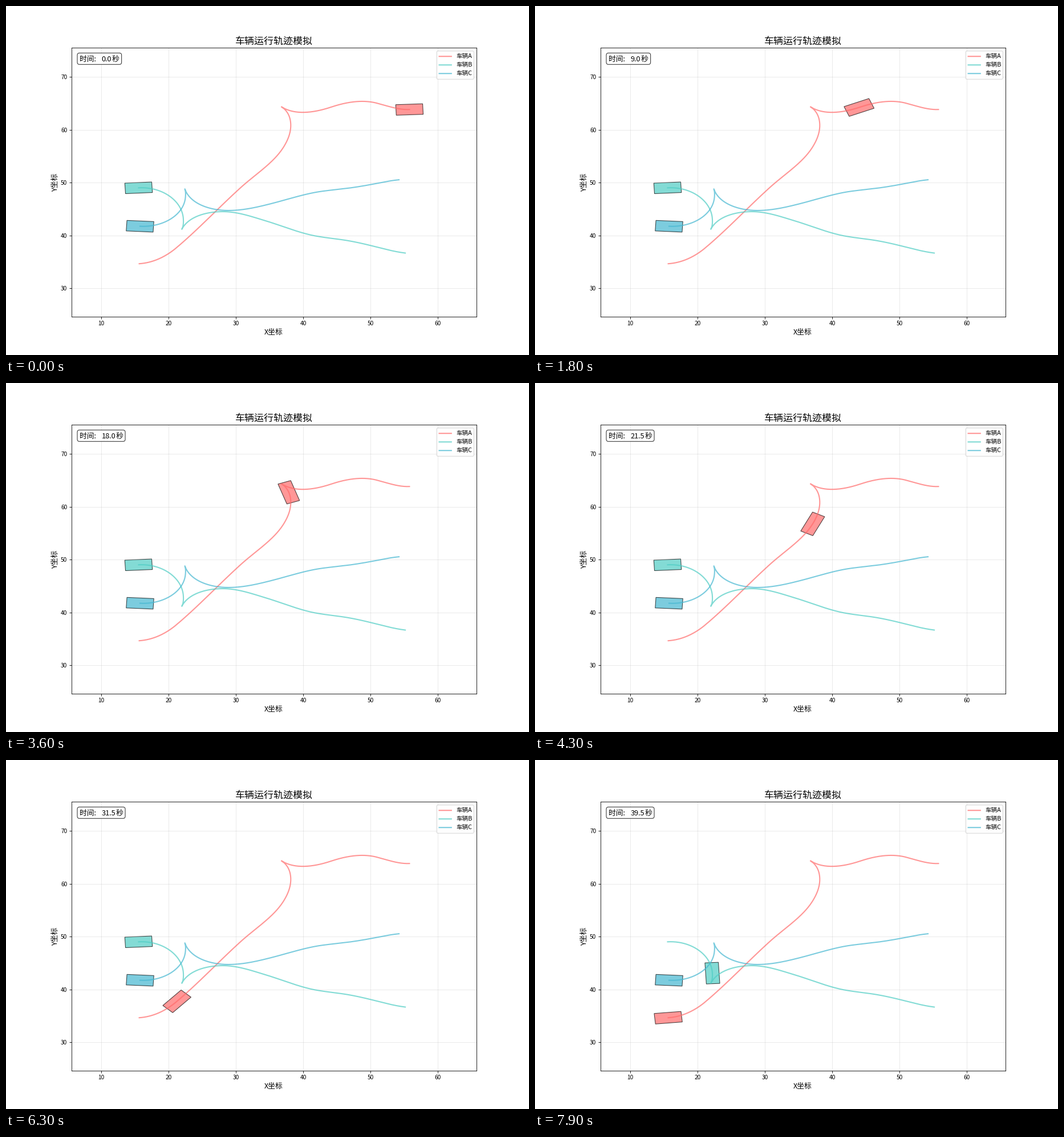
These frames come from a looping animation (917 px wide and 611 px high, 8 s). A matplotlib script:

```python
import numpy as np
import matplotlib.pyplot as plt
from matplotlib.animation import FuncAnimation
from matplotlib.patches import FancyBboxPatch, Polygon

W, H, DPI = 917, 611, 76.4
FRAMES, INTERVAL = 80, 100
EM = 12 * DPI / 72
plt.rcParams["font.family"] = "Noto Sans CJK JP"

# the tiny surplus keeps the pixel size from rounding down
fig = plt.figure(figsize=((W + 1e-6) / DPI, (H + 1e-6) / DPI), dpi=DPI, facecolor="white")
ax = fig.add_subplot()
ax.set(xlim=(5.6, 65.75), ylim=(24.65, 75.5),
       xticks=range(10, 61, 10), yticks=range(30, 71, 10))
ax.tick_params(labelsize=9.5)
ax.grid(alpha=0.3)

# overlay in stage pixels, y pointing down
hud = fig.add_axes([0, 0, 1, 1])
hud.set(xlim=(0, W), ylim=(H, 0))
hud.axis("off")


def smooth(u):
    return u * u * (3 - 2 * u)


def cruise(u, ramp=0.174):
    """Constant speed with short linear ramps at both ends."""
    edge = min(u, 1 - u)
    if edge >= ramp:
        return (u - ramp / 2) / (1 - ramp)
    s = edge**2 / (2 * ramp * (1 - ramp))
    return s if u < 0.5 else 1 - s


def drive(poses):
    """Join poses (stage x, y, heading in degrees) with near-circular arcs."""
    x, y, deg = np.array(poses, float).T
    p = ax.transData.inverted().transform(np.c_[x, H - y])
    a = np.radians(deg)
    d = np.c_[np.cos(a), np.sin(a)]
    t = np.linspace(0, 1, 50, endpoint=False)[:, None]
    arcs = []
    for i in range(len(p) - 1):
        k = np.hypot(*(p[i + 1] - p[i])) / (3 * np.cos((a[i + 1] - a[i]) / 4)**2)
        q, r = p[i] + k * d[i], p[i + 1] - k * d[i + 1]
        arcs.append((1 - t)**3 * p[i] + 3 * t * (1 - t)**2 * q
                    + 3 * t**2 * (1 - t) * r + t**3 * p[i + 1])
    return np.vstack(arcs + [p[-1:]])


class Car:
    BODY = np.array([(-2, -1), (2, -1), (2, 1), (-2, 1)])

    def __init__(self, color, legs, moves=()):
        runs = [drive(leg) for leg in legs]
        self.xy = np.vstack(runs)
        slopes = np.vstack([np.gradient(r, axis=0) for r in runs])
        # the body is symmetric, so the heading only matters modulo pi
        self.angle = np.unwrap(np.arctan2(slopes[:, 1], slopes[:, 0]), period=np.pi)
        self.dist = np.r_[0, np.hypot(*np.diff(self.xy, axis=0).T).cumsum()]
        self.lengths = [np.hypot(*np.diff(r, axis=0).T).sum() for r in runs]
        self.color, self.moves = color, moves
        ax.plot(*self.xy.T, color=color, lw=2, alpha=0.7)
        self.patch = ax.add_patch(Polygon(self.BODY, facecolor=color,
                                          edgecolor="black", lw=1, alpha=0.7))

    def place(self, frame):
        s = sum(length * ease(np.clip((frame - start) / (end - start), 0, 1))
                for length, (start, end, ease) in zip(self.lengths, self.moves))
        x, y, a = (np.interp(s, self.dist, c) for c in (*self.xy.T, self.angle))
        c, n = np.cos(a), np.sin(a)
        self.patch.set_xy(self.BODY @ np.array([(c, n), (-n, c)]) + (x, y))


# every car has two legs that meet in a cusp, where it changes gear
cars = [
    Car("#FF6B6B", [
        [(707.4, 181.2, 183), (650, 170, 162), (570, 177, 203), (483, 176.5, 141)],
        [(483, 176.5, -39), (499.3, 209, -90), (485.7, 248.5, -117),
         (412.3, 317.2, -131), (298.5, 423.5, -133), (233.6, 451.2, -175)],
    ], moves=[(0, 30.2, cruise), (30, 74.5, smooth)]),
    Car("#4ECDC4", [
        [(232.5, 318.3, 4), (311, 373.5, -88), (308.3, 390.8, -112)],
        [(308.3, 390.8, 68), (380, 360, 0), (455, 376, -21), (535, 401, -16),
         (590, 409.3, -10.5), (660, 424.5, -18), (700, 432.5, -9)],
    ], moves=[(70, 82.1, smooth)]),
    Car("#45B7D1", [
        [(235, 385.6, -4), (314.6, 335, 86), (313.6, 320.3, 105)],
        [(313.6, 320.3, -75), (390, 358, 0), (465, 346, 18), (540, 326.7, 14),
         (590, 320.2, 8.5), (650, 310.6, 14), (689, 304.2, 7)],
    ]),
]

hud.text(470, 66.8, "车辆运行轨迹模拟", size=16, ha="center")
hud.text(469.5, 574.5, "X坐标", size=12, ha="center")
hud.text(90.5, 309, "Y坐标", size=12, ha="center", rotation=90, rotation_mode="anchor")

# legend
hud.add_patch(FancyBboxPatch((755.3, 78.8), 65, 49.4, boxstyle="round,pad=0,rounding_size=2.1",
                             facecolor="white", edgecolor="0.8", alpha=0.8, lw=1))
for row, (car, name) in enumerate(zip(cars, "ABC")):
    y = 88.2 + 15 * row
    hud.plot([759.6, 780.8], [y, y], color=car.color, lw=2, alpha=0.7, snap=False)
    hud.text(789.6, y + 2.8, "车辆" + name, size=10)

# clock, laid out on half-width cells
CX, CY = 128.8, 96.9
clock_box = hud.add_patch(FancyBboxPatch((CX, 86.1), 5.5 * EM, 12.4, boxstyle="round,pad=3.8",
                                         facecolor="white", edgecolor="black", alpha=0.8, lw=1))
hud.text(CX, CY, "时间:", size=12)
value = hud.text(CX, CY, "", size=12, ha="center")
unit = hud.text(CX, CY, "秒", size=12)


def update(frame):
    for car in cars:
        car.place(frame)
    label = f"{frame * 0.5:.1f}"
    n = len(label)
    value.set_text(label)
    value.set_x(CX + EM * (3 + n / 4))
    unit.set_x(CX + EM * (3 + n / 2))
    clock_box.set_width(EM * (4 + n / 2))
    return [car.patch for car in cars] + [clock_box, value, unit]


anim = FuncAnimation(fig, update, frames=FRAMES, interval=INTERVAL, repeat=True)
plt.show()
```
